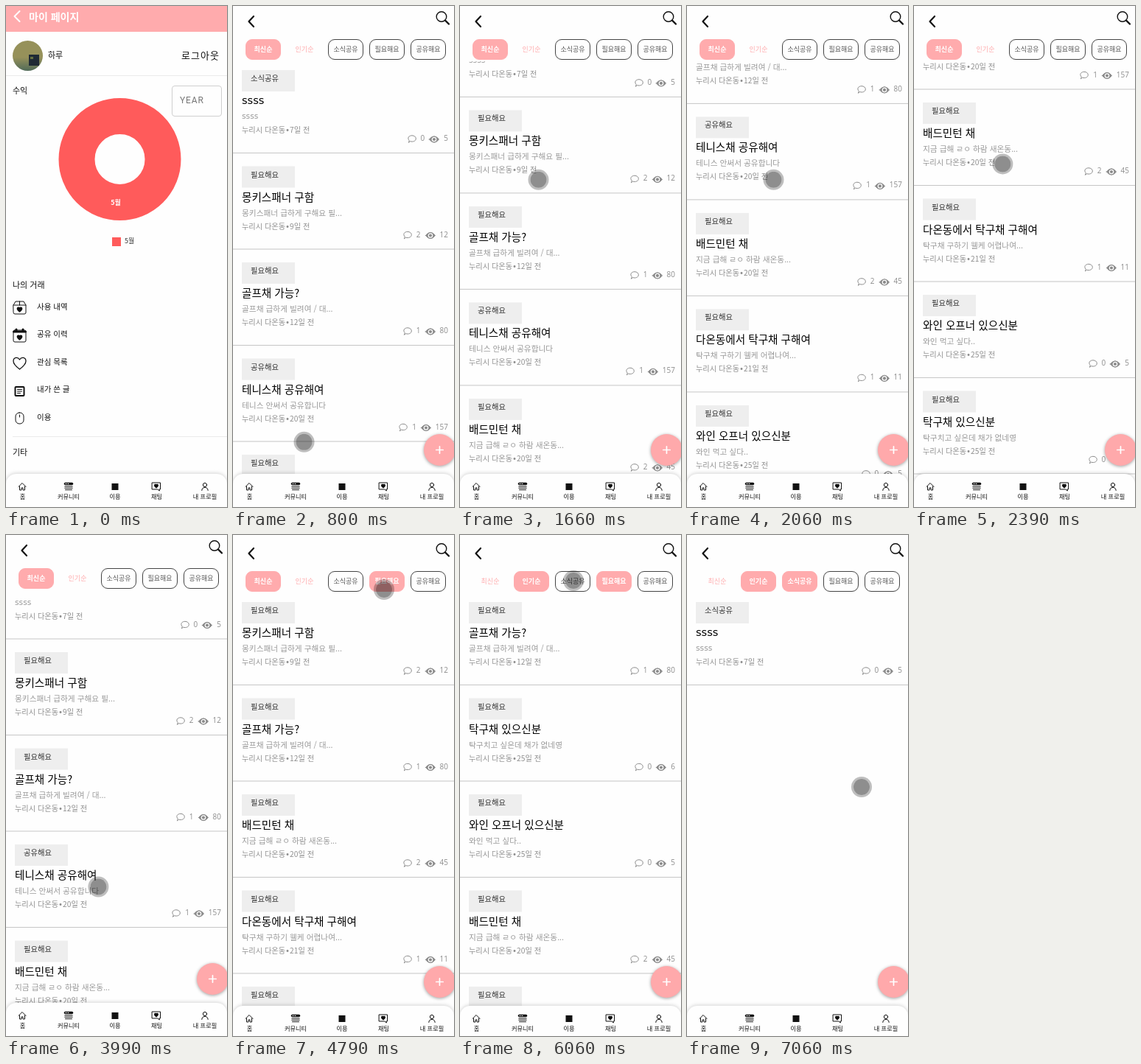
Write an HTML page that moves like this. It is 300 px wide and 680 px high and loops after 7.12 s.

```html
<!DOCTYPE html>
<html lang="ko">
<head>
<meta charset="utf-8">
<title>커뮤니티</title>
<style>
html, body { margin: 0; width: 100%; height: 100%; overflow: hidden; background: #fefefe; }
body { position: relative; font-family: "Noto Sans CJK KR", "Noto Sans CJK", "Noto Sans", sans-serif; color: #111; }
div, svg { position: absolute; }
svg { overflow: visible; fill: none; stroke: #111; stroke-linejoin: round; stroke-linecap: round; }
.page { left: 0; top: 0; width: 300px; height: 680px; }
.t { white-space: pre; line-height: 20px; }
.mid { transform: translateX(-50%); }
.latin { font-family: "DejaVu Sans", sans-serif; }
.head { left: 0; top: 0; width: 300px; height: 35px; background: #ffabad; }
.line { height: 1px; background: #ebebeb; right: 0; }
.year { left: 225px; top: 108px; width: 66px; height: 40px; border: 1px solid #cfcfcf; border-radius: 4px; }
.key { left: 144px; top: 314px; width: 12px; height: 12px; background: #ff5b5b; }
#list { left: 0; top: 75px; width: 300px; height: 570px; overflow: hidden; }
.row { left: 0; top: 0; width: 300px; height: 113px; }
.badge { left: 12px; top: 0; width: 72px; height: 28.5px; background: #eee; }
.row .line { left: 0; top: 112px; background: #c6c6c6; }
.stat { right: 8px; top: 82px; height: 20px; display: flex; align-items: center; gap: 6px;
  font: 10px/20px "Open Sans", "Noto Sans", sans-serif; color: #8c8c8c; }
.stat svg { position: static; stroke: #8c8c8c; margin-top: 3px; }
.chip { box-sizing: border-box; top: 45px; width: 48px; height: 28px; border-radius: 9px;
  border: 1px solid transparent; font-size: 9px; line-height: 25px; text-align: center; }
.sort { color: #ffabad; }
.kind { color: #555; border-color: #444; }
.chip.on { background: #ffabad; border-color: #ffabad; color: #fff; font-weight: 700; }
.fab { left: 259px; top: 581px; width: 43px; height: 43px; border-radius: 50%; background: #ffa9ab;
  box-shadow: 0 1px 4px rgba(0,0,0,.38); }
.nav { left: 0; top: 635px; width: 300px; height: 60px; background: #fefefe; border-radius: 14px 14px 0 0;
  box-shadow: 0 -1px 5px rgba(0,0,0,.17); }
#dot { left: -14px; top: -14px; width: 22px; height: 22px; border: 3px solid rgba(0,0,0,.25);
  border-radius: 50%; background: rgba(0,0,0,.44); background-clip: padding-box; }
</style>
</head>
<body>
<div id="app" class="page">
  <div id="mine" class="page"></div>
  <div id="board" class="page"><div id="list"></div></div>
  <div id="nav" class="nav"></div>
</div>
<div id="dot"></div>
<script>
const $ = id => document.getElementById(id);
const add = (to, html) => { to.insertAdjacentHTML('beforeend', html); return to.lastElementChild; };
const text = (to, x, y, size, str, css = '', cls = '') =>
  add(to, `<div class="t ${cls}" style="left:${x}px;top:${y - 10.5}px;font-size:${size}px;${css}">${str}</div>`);
const icon = (to, x, y, w, h, shapes) =>
  add(to, `<svg style="left:${x}px;top:${y}px" width="${w}" height="${h}">${shapes}</svg>`);
const heart = (x, y, s, fill = '#111') =>
  `<path transform="translate(${x} ${y}) scale(${s})" fill="${fill}" stroke-width="${1.3 / s}"
    d="M0 8C-4 5-8.5 1-8.5-3C-8.5-8-2.5-9.5 0-5C2.5-9.5 8.5-8 8.5-3C8.5 1 4 5 0 8Z"/>`;

// profile page
const mine = $('mine');
add(mine, '<div class="head"></div>');
icon(mine, 10, 6, 10, 16, '<path d="M8.5 1L1.5 8L8.5 15" stroke="#fff" stroke-width="2"/>');
text(mine, 31, 14, 14, '마이 페이지', 'color:#fff;font-weight:700');
icon(mine, 9, 47, 41, 41, `
  <defs><linearGradient id="sky" x2="0" y2="1"><stop offset=".55" stop-color="#96915a"/><stop offset="1" stop-color="#506a58"/></linearGradient></defs>
  <g stroke="none"><circle cx="20.5" cy="20.5" r="20.5" fill="url(#sky)"/>
  <rect x="22" y="19" width="14" height="15" fill="#1f2a35"/><rect x="24" y="22" width="4" height="3" fill="#65703f"/></g>`);
text(mine, 57, 66, 11, '하루');
text(mine, 238, 67, 13, '로그아웃', 'letter-spacing:1px');
add(mine, '<div class="line" style="left:0;top:94px"></div>');
text(mine, 9, 114, 11, '수익');
icon(mine, 71, 125, 167, 167, '<circle cx="83.5" cy="83" r="58.5" stroke="#ff5b5b" stroke-width="49"/>');
text(mine, 149, 267, 9, '5월', 'color:#fff;font-weight:700', 'mid');
add(mine, '<div class="key"></div>');
text(mine, 161, 319, 9, '5월', 'color:#333');
add(mine, '<div class="year"></div>');
text(mine, 236, 128.5, 12, 'YEAR', 'color:#777;letter-spacing:.9px;font-family:Roboto,sans-serif');
text(mine, 9, 378.5, 11, '나의 거래');
const menu = [
  ['사용 내역', `<path d="M1 6L4 1H15L18 6V16Q18 18 16 18H3Q1 18 1 16ZM1 6H18M9.5 1V6"/>${heart(9.5, 12, .38)}`],
  ['공유 이력', `<rect x="1" y="2" width="17" height="16" rx="2"/><path d="M1.5 4H17.5M5 1V3M14 1V3" stroke-width="3"/>${heart(9.5, 12, .38)}`],
  ['관심 목록', heart(9.5, 10, 1, 'none')],
  ['내가 쓴 글', '<rect x="3.5" y="4" width="12" height="12" rx="1" stroke-width="2"/><path d="M6.5 7.5H12.5M6.5 10H12.5M6.5 12.5H10.5"/>'],
  ['이용', '<rect x="4" y="2" width="11" height="15" rx="5"/><path d="M9.5 5V8"/>']
];
menu.forEach(([name, shapes], i) => {
  icon(mine, 8.5, 400 + i * 37.5, 19, 19, shapes);
  text(mine, 42, 408 + i * 37.5, 10.5, name);
});
add(mine, '<div class="line" style="left:9px;top:584px"></div>');
text(mine, 9, 605, 11, '기타');

// community page
const board = $('board');
const NEED = '필요해요', SHARE = '공유해요', NEWS = '소식공유';
const posts = [
  [NEWS, 'ssss', 'ssss', 7, 0, 5],
  [NEED, '몽키스패너 구함', '몽키스패너 급하게 구해요 필...', 9, 2, 12],
  [NEED, '골프채 가능?', '골프채 급하게 빌려여 / 대...', 12, 1, 80],
  [SHARE, '테니스채 공유해여', '테니스 안써서 공유합니다', 20, 1, 157],
  [NEED, '배드민턴 채', '지금 급해 ㄹㅇ 하람 새온동...', 20, 2, 45],
  [NEED, '다온동에서 탁구채 구해여', '탁구채 구하기 웰케 어렵나여...', 21, 1, 11],
  [NEED, '와인 오프너 있으신분', '와인 먹고 싶다..', 25, 0, 5],
  [NEED, '탁구채 있으신분', '탁구치고 싶은데 채가 없네영', 25, 0, 6]
];
const bubble = '<svg width="12" height="11"><path d="M1.5 10L2.3 7.8C-1 4 2 .8 6 .8C9 .8 11.3 2.6 11.3 5C11.3 8.5 7 9.8 4 8.8Z"/></svg>';
const eye = `<svg width="14" height="10"><path d="M.5 5Q3.5 .8 7 .8T13.5 5Q10.5 9.2 7 9.2T.5 5Z" fill="#8c8c8c"/>
  <circle cx="7" cy="5" r="2.7" stroke="#fff" stroke-width="1.2"/></svg>`;
const rows = posts.map(([kind, title, body, days, talks, views]) => {
  const row = add($('list'), '<div class="row"><div class="badge"></div><div class="line"></div></div>');
  const cls = title === 'ssss' ? 'latin' : '';
  text(row, 24, 11, 10.3, kind, 'color:#333');
  text(row, 12, 41.5, 14.6, title, 'color:#000;font-weight:500', cls);
  text(row, 12, 63.5, 10.7, body, 'color:#999', cls);
  text(row, 12, 81.5, 10.2, `누리시 다온동<span class="latin">•</span>${days}일 전`, 'color:#8f8f8f');
  add(row, `<div class="stat">${bubble}<span>${talks}</span>${eye}<span>${views}</span></div>`);
  return row;
});
icon(board, 20, 13, 10, 16, '<path d="M8 1L1.5 8L8 15" stroke-width="2.2"/>');
icon(board, 275, 6, 20, 20, '<circle cx="8" cy="8.5" r="6.8" stroke-width="1.4"/><path d="M13 13.5L18 18.5" stroke-width="2.4"/>');
const chips = ['최신순', '인기순', NEWS, NEED, SHARE].map((name, i) =>
  add(board, `<div class="chip ${i < 2 ? 'sort' : 'kind'}" style="left:${17 + i * 56}px">${name}</div>`));
add(board, '<div class="fab"></div>');
icon(board, 275, 597, 11, 11, '<path d="M5.5 .8V10.2M.8 5.5H10.2" stroke="#fff" stroke-width="1.7"/>');

// bottom bar
const tabs = [
  ['홈', 22.5, '<path d="M1 6.5L6 1.5L11 6.5M2.5 6V11H5V8H7V11H9.5V6"/>'],
  ['커뮤니티', 85, '<path d="M1.5 2.5H10.5" stroke-width="3.5"/><path d="M.8 6H11.2M.8 8.3H11.2M1.5 10.7H10.5"/><path d="M2 2.5H3M5 2.5H6" stroke="#fff"/>'],
  ['이용', 148, '<rect x="1.5" y="2" width="9" height="9" fill="#111" stroke="none"/>'],
  ['채팅', 204.5, `<path d="M.5 1H11.5V10H10L10.5 12L7.5 10H.5Z"/>${heart(6, 5.5, .28)}`],
  ['내 프로필', 270, '<circle cx="6" cy="4" r="2.6"/><path d="M1.8 11.5Q2 7.5 6 7.5T10.2 11.5"/>']
];
tabs.forEach(([name, x, shapes]) => {
  icon($('nav'), x - 6.5, 11, 12, 12, shapes);
  text($('nav'), x, 30, 8.2, name, '', 'mid');
});

// motion
const LOOP = 7120, PITCH = 130.5, FIRST = 12, END = 478;
const SWIPE = 1460, BEAT = 400, STEP = 252, PULL = 3120, TOP = 4100;
const clamp = (v, lo, hi) => Math.min(hi, Math.max(lo, v));
const ease = p => p * p * (3 - 2 * p);

// pointer glides: from, to, x, y
const glides = [
  [60, 460, 95, 664], [660, 1200, 104, 237], [SWIPE, SWIPE + 2 * BEAT, 120, 237],
  [2260, 2850, 123, 58], [PULL, 3450, 124, 330], [3790, TOP, 126, 536], [TOP, 4460, 205, 74],
  [5190, 5520, 160, 150], [5520, 5850, 97, 62], [5930, 6060, 154, 62], [6330, 6990, 198, 174], [7060, 7061, 237, 342]
];
const swipes = t => clamp((t - SWIPE) / BEAT, 0, 2);

function pointer(t) {
  let x = 98, y = 680;
  for (const [from, to, nx, ny] of glides) {
    const p = ease(clamp((t - from) / (to - from), 0, 1));
    x += (nx - x) * p;
    y += (ny - y) * p;
  }
  return [x, y + 75 * Math.sin(2 * Math.PI * swipes(t))];
}

// two swipes down the list, then the finger pulls it back
function scroll(t, y) {
  if (t >= TOP) return 0;
  if (t >= PULL) return END - clamp(y - 58, 0, END);
  const n = Math.floor(swipes(t)), p = swipes(t) - n;
  return Math.min(END, STEP * (n + p ** 1.74));
}

const only = kind => posts.flatMap((p, i) => p[0] === kind ? [i] : []);
// start, lit chips, order of posts
const views = [
  [0, [0], posts.map((p, i) => i)],
  [4590, [0, 3], only(NEED)],
  [5930, [1, 3], [2, 7, 6, 4, 5, 1]],
  [6330, [1, 2], only(NEWS)]
];
const show = (el, on) => { el.style.display = on ? '' : 'none'; };

function draw(t) {
  const onBoard = t >= 660, [x, y] = pointer(t), top = scroll(t, y);
  show(mine, !onBoard);
  show(board, onBoard);
  show($('dot'), t >= 60);
  $('dot').style.transform = `translate(${x}px,${y}px)`;
  $('app').style.transform = `translateY(${t < TOP ? 0 : 4}px)`;
  const [, lit, order] = views.filter(v => v[0] <= t).pop();
  chips.forEach((c, i) => c.classList.toggle('on', lit.includes(i)));
  rows.forEach((row, i) => {
    const n = order.indexOf(i);
    show(row, n >= 0);
    row.style.transform = `translateY(${FIRST + n * PITCH - top}px)`;
  });
}

const start = performance.now();
function tick() {
  draw((performance.now() - start) % LOOP);
  requestAnimationFrame(tick);
}
tick();
</script>
</body>
</html>
```
